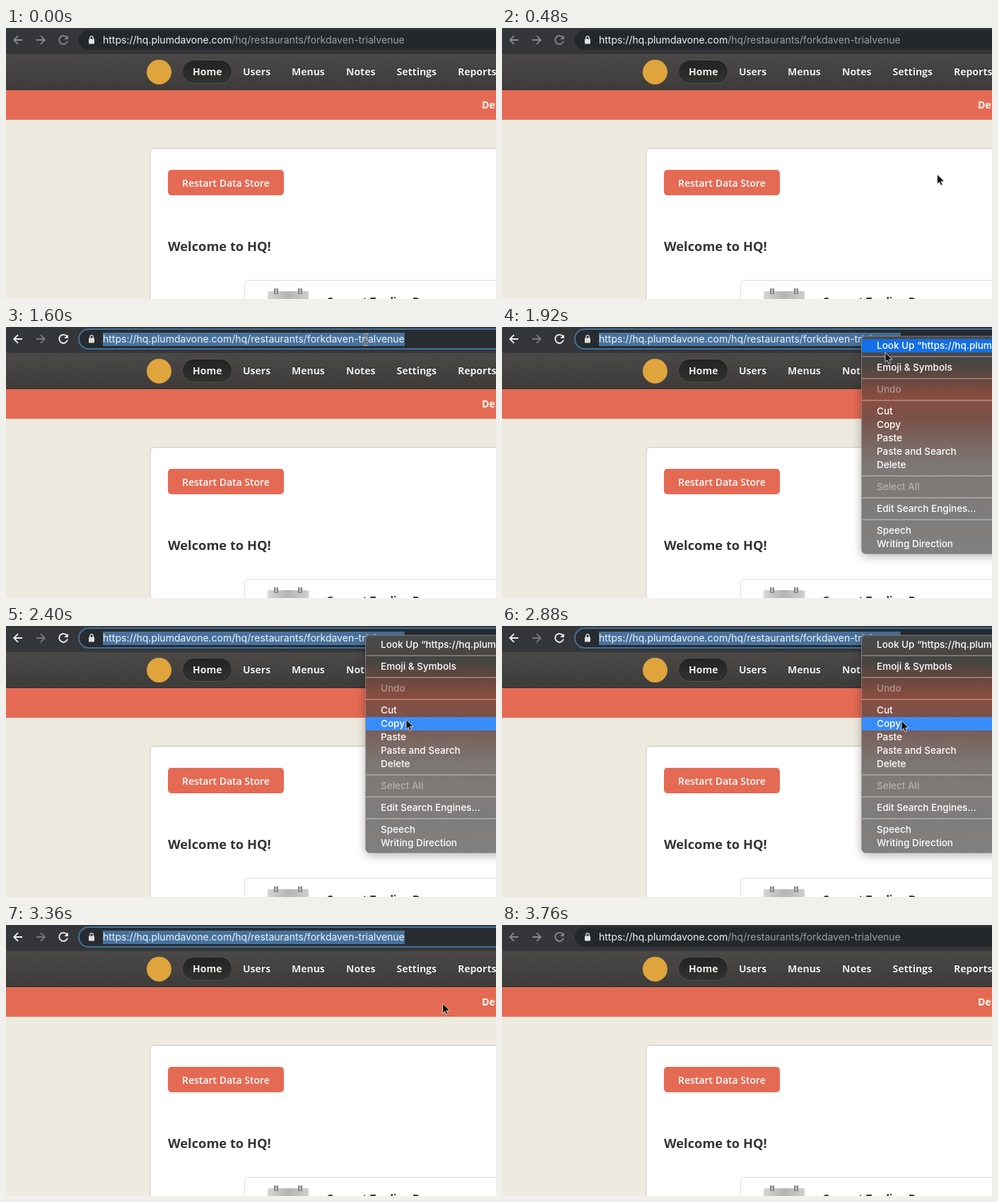
Write an HTML page that moves like this. It is 693x384 px and loops after 3840 ms.

```html
<!DOCTYPE html>
<html lang="en">
<head>
<meta charset="utf-8">
<title>Copy the address</title>
<style>
  html, body { margin: 0; width: 100%; height: 100%; overflow: hidden; background: #eeeadf; }
  svg { display: block; width: 693px; height: 384px; }
  text { white-space: pre; }
  .ui { font-family: Inter, "Liberation Sans", sans-serif; }
  .page { font-family: "Open Sans", "Noto Sans", sans-serif; font-weight: 700; font-size: 14px; }
  .nav { fill: #efefef; text-shadow: 0 -1px 1px rgba(0,0,0,.5); }
  .icon { fill: none; stroke-width: 1.8; }
  .panel { filter: drop-shadow(0 3px 7px rgba(0,0,0,.3)); }
</style>
</head>
<body>
<svg viewBox="0 0 693 384" xmlns="http://www.w3.org/2000/svg">
  <defs>
    <linearGradient id="navFill" x2="0" y2="1">
      <stop stop-color="#4a4948"/><stop offset="1" stop-color="#3d3c3b"/>
    </linearGradient>
    <linearGradient id="pillFill" x2="0" y2="1">
      <stop stop-color="#232323"/><stop offset="1" stop-color="#323231"/>
    </linearGradient>
    <linearGradient id="calFill">
      <stop stop-color="#d6d6d6"/><stop offset=".5" stop-color="#b4b4b4"/><stop offset="1" stop-color="#cfcfcf"/>
    </linearGradient>
    <linearGradient id="menuFill" gradientUnits="userSpaceOnUse" x1="0" y1="13" x2="0" y2="321">
      <stop stop-color="#4b4b4b"/>
      <stop offset=".12" stop-color="#464443"/>
      <stop offset=".19" stop-color="#62483f"/>
      <stop offset=".28" stop-color="#8a4d40"/>
      <stop offset=".38" stop-color="#7a5249"/>
      <stop offset=".48" stop-color="#7a655f"/>
      <stop offset=".6" stop-color="#7d7875"/>
      <stop offset="1" stop-color="#808080"/>
    </linearGradient>
  </defs>

  <!-- page -->
  <rect width="693" height="384" fill="#eeeadf"/>
  <rect x="204" y="170.5" width="520" height="240" rx="6" fill="#fff" stroke="#cbc9c6"/>
  <rect x="229" y="201" width="164" height="36" rx="5" fill="#e56a54"/>
  <text class="page" x="249" y="225" fill="#fff" style="font-weight:600">Restart Data Store</text>
  <text class="page" x="229" y="316" fill="#333" style="font-size:18.3px">Welcome to HQ!</text>
  <rect x="337.5" y="357.5" width="400" height="60" rx="4" fill="#fff" stroke="#dfdfdf"/>
  <rect x="370" y="373" width="58" height="14" rx="2" fill="url(#calFill)"/>
  <path d="M382 369v8M416 369v8" stroke="#858585" stroke-width="6"/>
  <path d="M382 369v7M416 369v7" stroke="#c4c4c4" stroke-width="2"/>
  <text class="page" x="453" y="391.5" fill="#333" style="font-size:15px">Current Trading Day</text>

  <!-- header -->
  <rect y="37" width="693" height="51" fill="url(#navFill)"/>
  <rect y="87" width="693" height="1" fill="#2f2e2e"/>
  <rect y="88" width="693" height="42" fill="#e56a54"/>
  <text class="page" x="673" y="114" fill="#fff">Demo</text>
  <circle cx="216.5" cy="62.5" r="17.5" fill="#dfa53c"/>
  <rect x="249.5" y="45.5" width="70" height="33" rx="16.5" fill="url(#pillFill)" stroke="#525150"/>
  <g id="nav" class="page nav"></g>

  <!-- browser bar -->
  <rect width="693" height="37" fill="#35363a"/>
  <path id="back" class="icon" d="M23 17H11.5M17 11.2L11.2 17L17 22.8"/>
  <path id="next" class="icon" d="M43 17H54.5M49 11.2L54.8 17L49 22.8"/>
  <g id="reload">
    <path class="icon" d="M86 13.2A6 6 0 1 0 87 18.5"/>
    <path d="M87.8 10.5V16H82.3Z" stroke="none"/>
  </g>
  <rect id="bar" x="103" y="3" width="640" height="28" rx="14"/>
  <rect id="sel" x="137" y="8" width="427" height="19" fill="#47729d"/>
  <rect x="117" y="15.5" width="8" height="7" rx="1" fill="#dfe1e5"/>
  <path d="M118.8 16v-2.2a2.2 2.2 0 0 1 4.4 0V16" fill="none" stroke="#dfe1e5" stroke-width="1.3"/>
  <text id="url" class="ui" x="137" y="22" font-size="14" fill="#f1f3f4">https://hq.plumdavone.com<tspan id="path">/hq/restaurants/forkdaven-trialvenue</tspan></text>

  <!-- context menu -->
  <g id="menu">
    <rect class="panel" x="508.5" y="13" width="240" height="308.5" rx="6" fill="url(#menuFill)" stroke="#989694" stroke-opacity=".7"/>
    <rect id="hot" x="509" width="200" height="19"/>
    <g id="items" class="ui" font-size="13.5" font-weight="500"></g>
  </g>

  <!-- pointer -->
  <g id="ring" fill="none">
    <circle r="15.6" stroke="#111" stroke-width="4.6"/>
    <circle r="15.6" stroke="#fff" stroke-width="2.4"/>
  </g>
  <g id="beam" fill="none">
    <path d="M-3.5-7.5Q0-7.5 0-5Q0-7.5 3.5-7.5M0-5V5M-3.5 7.5Q0 7.5 0 5Q0 7.5 3.5 7.5M-2 2.5H2" stroke="#c9c9c9" stroke-width="2.6"/>
    <path d="M-3.5-7.5Q0-7.5 0-5Q0-7.5 3.5-7.5M0-5V5M-3.5 7.5Q0 7.5 0 5Q0 7.5 3.5 7.5M-2 2.5H2" stroke="#333" stroke-width="1"/>
  </g>
  <path id="arrow" d="M0 0V14L3.1 11L5.2 15.8L7.5 14.8L5.5 10.1H10Z" fill="#111" stroke="#ddd" stroke-width=".9" stroke-linejoin="round"/>
</svg>

<script>
const LOOP = 3840, STEP = 80;
const FOCUS = 1040, OPEN = 1760, PICK = 2720, FADE = 2900, BLUR = 3680;
const $ = id => document.getElementById(id);

function add(parent, tag, attrs, text) {
  const el = document.createElementNS("http://www.w3.org/2000/svg", tag);
  for (const k in attrs) el.setAttribute(k, attrs[k]);
  if (text) el.textContent = text;
  parent.appendChild(el);
}
const set = (id, attrs) => { for (const k in attrs) $(id).setAttribute(k, attrs[k]); };
const show = (id, on) => $(id).setAttribute("display", on ? "inline" : "none");

[["Home", 264], ["Users", 335], ["Menus", 404], ["Notes", 481], ["Settings", 552.5], ["Reports", 639]]
  .forEach(([name, x]) => add($("nav"), "text", { x, y: 67 }, name));

// label, middle of the row, disabled
const rows = [
  ["Look Up “https://hq.plumdavone.com”", 26], ["Emoji & Symbols", 57], ["Undo", 88, true],
  ["Cut", 119], ["Copy", 138], ["Paste", 157], ["Paste and Search", 176], ["Delete", 195],
  ["Select All", 226, true], ["Edit Search Engines…", 257], ["Speech", 288], ["Writing Direction", 307]
];
rows.forEach(([label, y, off]) =>
  add($("items"), "text", { x: 530, y: y + 5, fill: "#fff", "fill-opacity": off ? .42 : 1 }, label));
[42, 73, 104, 211, 242, 273].forEach(y =>
  add($("items"), "rect", { x: 509, y: y - 1, width: 200, height: 2, fill: "#fff", "fill-opacity": .27 }));

// time, x, y
const track = [
  [160, 650, 400], [800, 581, 14.5], [1200, 581, 14.5], [1520, 509, 18], [1760, 509, 18],
  [1920, 542, 36], [2320, 566, 132.5], [2800, 566, 132.5], [3040, 562, 139], [3200, 562, 139], [3600, 720, 60]
];

function pointer(t) {
  const i = track.findIndex(k => k[0] > t);
  if (i < 1) return null;
  const [t0, x0, y0] = track[i - 1], [t1, x1, y1] = track[i];
  const p = (t - t0) / (t1 - t0), e = p * p * (3 - 2 * p);
  return [x0 + (x1 - x0) * e, y0 + (y1 - y0) * e];
}

function draw(t) {
  const focus = t >= FOCUS && t < BLUR;
  const ink = focus ? "#f1f3f4" : "#87898d";
  set("back", { stroke: ink });
  set("next", { stroke: focus ? "#77797d" : ink });
  set("reload", { stroke: ink, fill: ink });
  set("bar", { fill: focus ? "#282c30" : "#25282b", stroke: focus ? "#43729a" : "none", "stroke-width": 2 });
  set("path", { fill: focus ? "#f1f3f4" : "#9aa0a6" });
  show("sel", focus);
  if (focus) set("sel", { width: $("url").getComputedTextLength() });

  const at = pointer(t);
  const alpha = t < OPEN ? 0 : Math.max(0, Math.min(1, 1 - (t - FADE) / 210));
  show("menu", alpha > 0);
  set("menu", { opacity: alpha });
  const row = at && rows.find(r => !r[2] && Math.abs(at[1] - r[1]) <= 10);
  const lit = alpha > 0 && row && t !== PICK;
  show("hot", lit);
  if (lit) set("hot", { y: row[1] - 9, fill: row === rows[0] ? "#146fe6" : "#388cfa" });

  const typing = at && t < OPEN && at[1] < 32;
  show("beam", typing);
  show("arrow", at && !typing);
  show("ring", t >= 880 && t < FOCUS);
  if (at) ["beam", "arrow", "ring"].forEach(id => set(id, { transform: `translate(${at[0]} ${at[1]})` }));
}

function tick() {
  draw(Math.floor(performance.now() % LOOP / STEP) * STEP);
  requestAnimationFrame(tick);
}
tick();
</script>
</body>
</html>
```
